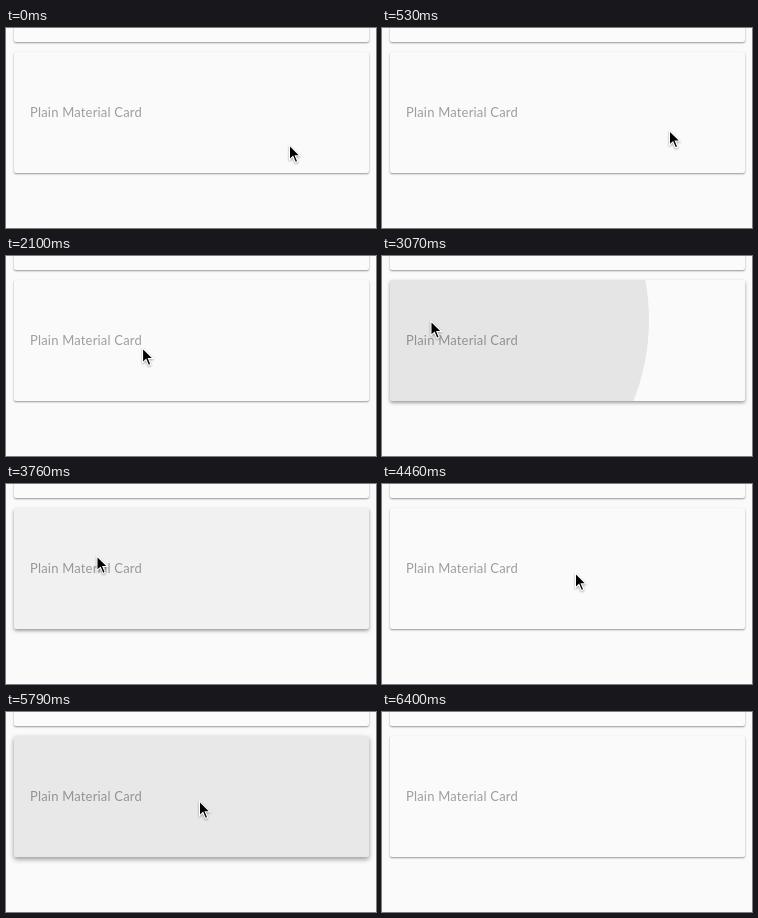
An HTML page that plays this animation: 370 by 200 pixels, repeating every 7.13 s.

```html
<!DOCTYPE html>
<html lang="en">
<head>
<meta charset="utf-8">
<title>Material card ripple</title>
<style>
  html, body { margin: 0; width: 100%; height: 100%; overflow: hidden; background: #fafafa; }
  .stage { position: relative; width: 370px; height: 200px; overflow: hidden; background: #fafafa; }
  .card {
    position: absolute; left: 8px; width: 355px; height: 121px;
    overflow: hidden; border-radius: 2px; background: #fafafa;
    box-shadow: 0 1px 2px rgba(0, 0, 0, .4);
  }
  .above { top: -107px; background: #fbfbfb; }
  .main { top: 24px; }
  .label {
    position: absolute; left: 16px; top: 50px;
    font: 13px/20px Lato, "Open Sans", sans-serif;
    letter-spacing: .19px; white-space: nowrap; color: #9e9e9e;
  }
  .ripple { position: absolute; border-radius: 50%; background: #000; }
  .cursor {
    position: absolute; left: 0; top: 0; overflow: visible;
    filter: drop-shadow(0 1px 1px rgba(0, 0, 0, .35));
  }
</style>
</head>
<body>
<div class="stage">
  <div class="card above"></div>
  <div class="card main">
    <div class="label">Plain Material Card</div>
    <div class="ripple"></div>
  </div>
  <svg class="cursor" width="13" height="20">
    <path fill="#fff" d="M0 0V16.6L3.7 13.2L6.2 19L9.4 17.6L7 12H12.2Z"/>
    <path d="M1 2.4V14.3L4.1 11.4L6.7 17.6L8 17L5.5 11H9.7Z"/>
  </svg>
</div>
<script>
  const LOOP = 7130, TICK = 87.3, INK = .108, GONE = 73;

  // Times are in ticks; bend delays the vertical part of a move
  const home = { x: 283, y: 116.2 };
  const moves = [
    { from: 0, to: 6, x: 287, y: 101.5, bend: 1 },
    { from: 20.75, to: 29, x: 48.5, y: 64, bend: 2.8 },
    { from: 41.5, to: 51, x: 193, y: 88.2, bend: 1 },
    { from: 69, to: GONE, x: 200, y: 205, bend: 1 }
  ];
  const presses = [
    { down: 13, up: 21, x: 288, y: 101, r: 190 },
    { down: 35, up: 42, x: 49, y: 64, r: 218 },
    { down: 59, up: 66, x: 193, y: 88, r: 250 }
  ];

  const card = document.querySelector('.main');
  const ripple = document.querySelector('.ripple');
  const cursor = document.querySelector('.cursor');
  const mix = (a, b, k) => a + (b - a) * k;
  const clamp = k => Math.min(Math.max(k, 0), 1);
  const easeOut = k => 1 - (1 - k) ** 2;

  function drawCursor(n) {
    let { x, y } = home;
    for (const m of moves) {
      const k = easeOut(clamp((n - m.from) / (m.to - m.from)));
      x = mix(x, m.x, k);
      y = mix(y, m.y, k ** m.bend);
    }
    cursor.style.transform = `translate(${x}px, ${y}px)`;
    cursor.style.visibility = n < GONE ? 'visible' : 'hidden';
  }

  function drawCard(n) {
    const p = presses.findLast(q => n >= q.down) || { ...presses[0], up: -3 };
    const age = Math.max(n - p.down, 0);
    const lift = clamp((age + 1) / 3) * clamp((p.up + 2 - n) / 3);
    const fade = clamp((p.up + 2 - n) / 3);
    const r = p.r + 110 * Math.min(age, 2);
    Object.assign(ripple.style, {
      left: p.x - 8 - r + 'px', top: p.y - 24 - r + 'px',
      width: 2 * r + 'px', height: 2 * r + 'px',
      opacity: Math.min(r / 2600, INK) * fade
    });
    card.style.boxShadow =
      `0 ${mix(1, 3, lift)}px ${mix(2, 7, lift)}px rgba(0, 0, 0, .4)`;
  }

  const start = performance.now();
  function loop() {
    const n = Math.floor((performance.now() - start) % LOOP / TICK);
    drawCursor(n);
    drawCard(n);
    requestAnimationFrame(loop);
  }
  loop();
</script>
</body>
</html>
```
